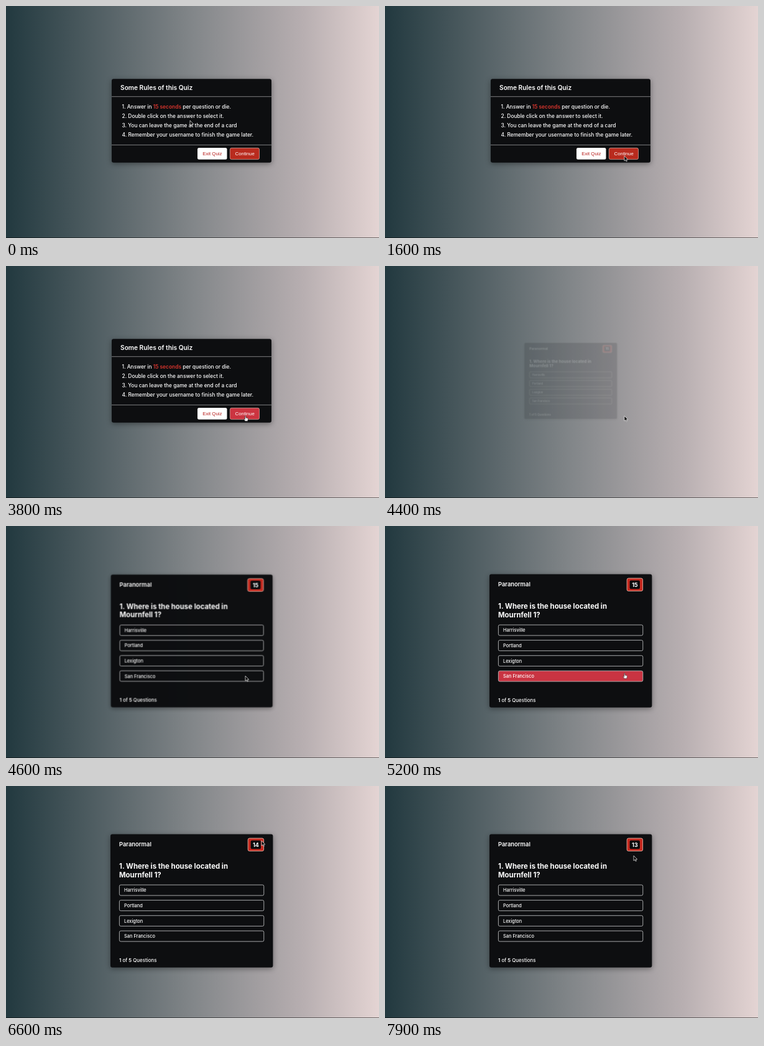
These frames come from a looping animation (600x373 px, 8 s). An HTML page:

```html
<!DOCTYPE html>
<html lang="en">
<head>
<meta charset="utf-8">
<title>Quiz</title>
<style>
  html, body { margin: 0; width: 100%; height: 100%; overflow: hidden; background: #22393f; }
  svg { display: block; width: 600px; height: 373px; }
  text { font-family: Inter, "Noto Sans", sans-serif; font-weight: 500; fill: #fff; white-space: pre; }
  .panel { fill: #0d0e10; filter: drop-shadow(0 2px 4px rgba(0, 0, 0, .4)); }
  .rule { stroke: #9a9b9c; stroke-width: .8; }
  .title { font-size: 10.2px; font-weight: 600; }
  .list { font-size: 8.4px; }
  .hot { fill: #d8352d; font-weight: 600; }
  .button { font: 7.8px "Liberation Sans", Arial, sans-serif; text-anchor: middle; }
  .topic { font-size: 9.4px; font-weight: 600; }
  .question { font-size: 11.4px; font-weight: 700; }
  .option { font-size: 7.4px; }
  .row { fill: #0d0e10; stroke: #b9babb; stroke-width: .9; }
  .count { font-size: 7.9px; }
  .count tspan { font-weight: 600; }
  .digits { font-size: 9px; font-weight: 700; text-anchor: middle; }
  #quiz { transform-origin: 298.7px 184.7px; }
</style>
</head>
<body>
<svg viewBox="0 0 600 373">
  <defs>
    <linearGradient id="sky">
      <stop offset="0" stop-color="#22393f"/>
      <stop offset=".5" stop-color="#828689"/>
      <stop offset=".8" stop-color="#b8afb1"/>
      <stop offset="1" stop-color="#e4d4d3"/>
    </linearGradient>
  </defs>
  <rect width="600" height="373" fill="url(#sky)"/>
  <rect y="372" width="600" height="1" fill-opacity=".5"/>

  <g id="rules">
    <rect class="panel" x="170" y="117.2" width="257" height="134.6" rx="3"/>
    <path class="rule" d="M170 145.7H427M170 223.4H427"/>
    <text class="title" x="184" y="134.6">Some Rules of this Quiz</text>
    <g id="list" class="list"></g>
    <rect x="308" y="228" width="47.5" height="18.7" rx="2.5" fill="#fff"/>
    <text class="button" x="331.8" y="240.3" style="fill:#b8201e">Exit Quiz</text>
    <rect id="go" x="360.3" y="228.3" width="47.2" height="18.3" rx="2.5" fill="#b92b1e" stroke="#d3a29c" stroke-width=".8"/>
    <text class="button" x="384.2" y="240.3">Continue</text>
  </g>

  <g id="quiz">
    <rect class="panel" x="168" y="77.5" width="261.4" height="214.3" rx="3"/>
    <text class="topic" x="182" y="97.3">Paranormal</text>
    <rect x="389.2" y="84" width="25.4" height="20.6" rx="2.5" fill="#c5281e" stroke="#e6b5a6" stroke-width=".9"/>
    <rect x="393.6" y="87.4" width="16.4" height="13.8" rx="2" fill="#0b0b0c"/>
    <g id="timer"></g>
    <text class="question" x="182" y="133.1">1. Where is the house located in</text>
    <text class="question" x="182" y="146.7">Mournfell 1?</text>
    <g id="options"></g>
    <text class="count" x="182" y="283"><tspan>1</tspan> of <tspan>5</tspan> Questions</text>
  </g>

  <g id="cursor">
    <path id="arrow" d="M0 0V8.1L1.9 6.4 3.1 9.1 4.4 8.5 3.2 5.9H5.7Z" fill="#050505" stroke="#f4f4f4" stroke-width=".7" stroke-linejoin="round"/>
    <path id="hand" d="M-.6 .3Q.2-.6 .9 .3V3L3.6 3.6Q4.6 3.9 4.4 5.2L3.7 8.4H-.3L-2.3 5.4Q-2.3 4.5-1.4 4.8L-.6 5.6Z" fill="#fff" stroke="#151515" stroke-width=".6" stroke-linejoin="round"/>
  </g>
</svg>
<script>
const LOOP = 8000;
const $ = id => document.getElementById(id);
const clips = [];

// steps: [ms, value] pairs; the first and last values are held to the ends
function play(el, prop, steps, easing = 'ease') {
  const held = [[0, steps[0][1]], ...steps, [LOOP, steps[steps.length - 1][1]]];
  const frames = held.map(([ms, value]) => ({ offset: ms / LOOP, [prop]: value, easing }));
  clips.push(el.animate(frames, { duration: LOOP, iterations: Infinity }));
}
const show = (el, ...steps) => play(el, 'opacity', steps, 'step-end');

function add(parent, markup) {
  $(parent).insertAdjacentHTML('beforeend', markup);
  return $(parent).lastElementChild;
}

// Rules card
[
  'Answer in <tspan class="hot">15 seconds</tspan> per question or die.',
  'Double click on the answer to select it.',
  'You can leave the game at the end of a card',
  'Remember your username to finish the game later.'
].forEach((line, i) => add('list', `<text x="186.5" y="${164.6 + 15.15 * i}">${i + 1}. ${line}</text>`));
play($('go'), 'fill', [[3500, '#b92b1e'], [3900, '#cd3441']]);

// Swap of the cards
const SWAP = 4367, POP = 270;
show($('rules'), [0, 1], [4300, 0]);
play($('quiz'), 'opacity', [[SWAP, 0], [SWAP + POP, 1]]);
play($('quiz'), 'transform', [[SWAP, 'scale(.5)'], [SWAP + POP, 'scale(1)']]);

// Countdown, one step a second
[15, 14, 13].forEach((n, i) => {
  const digits = add('timer', `<text class="digits" x="401.9" y="97.6">${n}</text>`);
  const on = i ? 5350 + 1000 * i : 0;
  show(digits, [0, i ? 0 : 1], [on, 1], [6350 + 1000 * i, 0].map((v, k) => k || v < LOOP ? v : LOOP));
});

// Answers light up in turn as the pointer sweeps upwards
const SWEEP = 5210, STEP = 70, FADE = 240;
const tint = k => `rgb(${13 + 188 * k}, ${14 + 38 * k}, ${16 + 50 * k})`;
['Harrisville', 'Portland', 'Lexigton', 'San Francisco'].forEach((label, i, all) => {
  const y = 159 + 24.65 * i;
  const row = add('options', `<rect class="row" x="182.4" y="${y}" width="232.4" height="17" rx="2.2"/>`);
  add('options', `<text class="option" x="190" y="${y + 11.4}">${label}</text>`);
  const last = i === all.length - 1;
  const leave = SWEEP + STEP * (all.length - 1 - i);
  const enter = last ? SWAP + POP : leave - STEP;
  const peak = last ? 1 : .25;
  play(row, 'fill', [[enter, tint(0)], [last ? enter + FADE : leave, tint(peak)], [leave, tint(peak)], [leave + FADE, tint(0)]]);
});

// Pointer
const stops = [
  [400, 296, 184], [1200, 400, 237], [1400, 379, 241], [1600, 385, 241],
  [5150, 385, 241], [5500, 389.5, 141.5], [6000, 399, 104], [7000, 417, 80], [7900, 400, 112]
];
play($('cursor'), 'transform', stops.map(([ms, x, y]) => [ms, `translate(${x}px, ${y}px)`]), 'ease-in-out');
const pointing = [[0, 0], [3500, 1], [4300, 0], [SWAP + POP, 1], [5420, 0]];
show($('hand'), ...pointing);
show($('arrow'), ...pointing.map(([ms, on]) => [ms, 1 - on]));

// One shared clock for every part
const start = document.timeline.currentTime || 0;
clips.forEach(clip => { clip.startTime = start; });
</script>
</body>
</html>
```
